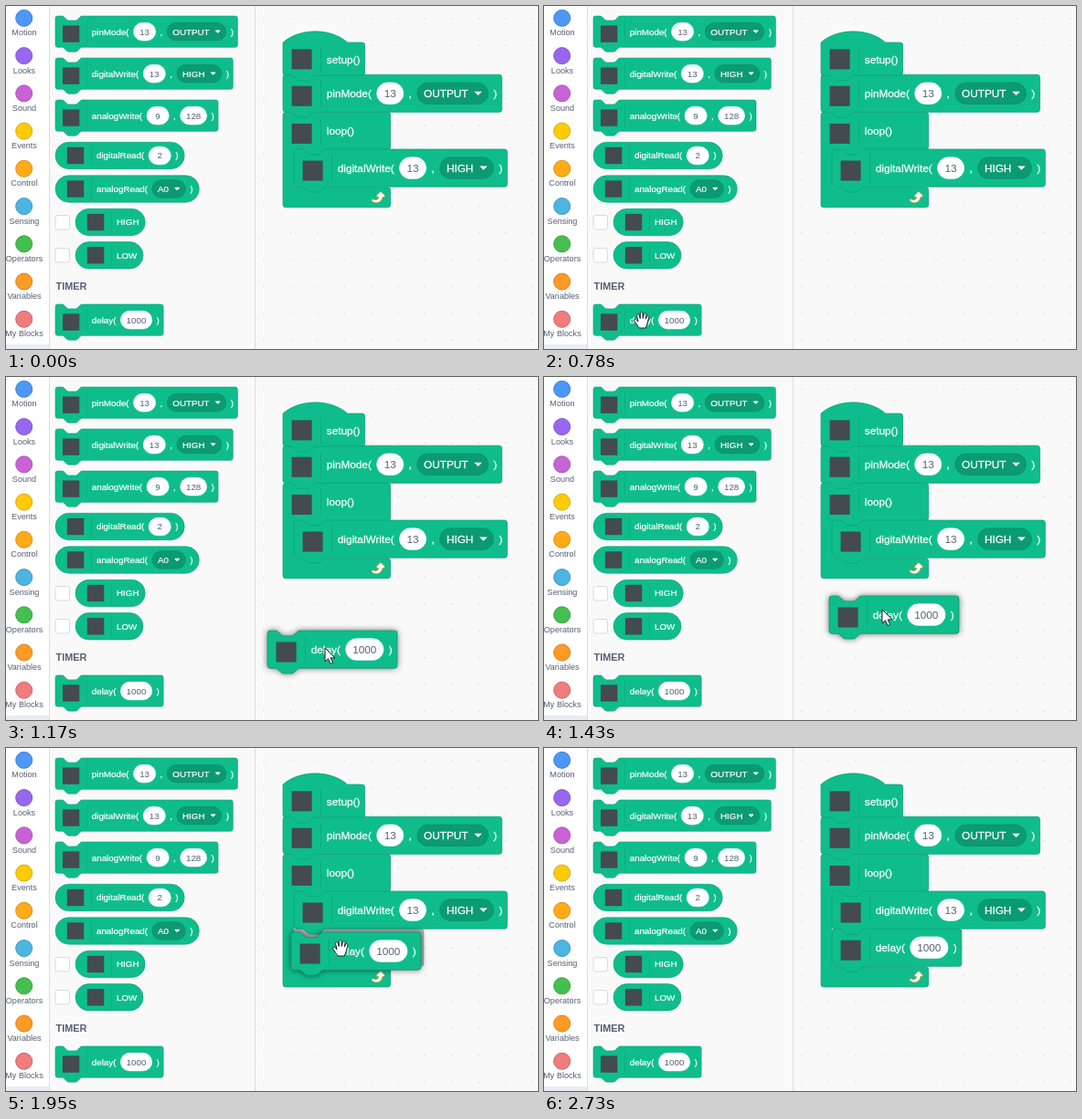
An HTML page with a canvas that plays this animation: 582x376 px, repeating every 3380 ms.

```html
<!DOCTYPE html>
<html lang="en">
<head>
<meta charset="utf-8">
<title>Block editor</title>
<style>
  html, body { margin: 0; width: 100%; height: 100%; overflow: hidden; background: #f9f9f9; }
  canvas { display: block; }
</style>
</head>
<body>
<canvas id="stage" width="582" height="376"></canvas>
<script>
const ctx = document.getElementById('stage').getContext('2d');
const LOOP = 3380, STEP = 130;
const SMALL = 0.612, LARGE = 0.735;
const GREEN = '#0fbd8c', EDGE = '#0c9f77', INK = '#575e75';
const FONT = '"Liberation Sans", Arial, sans-serif';

const CATEGORIES = [
  ['Motion', '#4d97f7'], ['Looks', '#9867ef'], ['Sound', '#c963d5'],
  ['Events', '#ffca08'], ['Control', '#ffab19'], ['Sensing', '#4cb5e2'],
  ['Operators', '#45bf4f'], ['Variables', '#ff9a24'], ['My Blocks', '#f07c7c']
];
const DELAY = ['delay(', '#1000', ')'];
const PIN_MODE = ['pinMode(', '#13', ',', '@OUTPUT', ')'];
const WRITE = ['digitalWrite(', '#13', ',', '@HIGH', ')'];

// Outline pieces, in block units
const NOTCH = 'c2 0 3 1 4 2l4 4c1 1 2 2 4 2h12c2 0 3-1 4-2l4-4c1-1 2-2 4-2';
const TAB = 'c-2 0-3 1-4 2l-4 4c-1 1-2 2-4 2h-12c-2 0-3-1-4-2l-4-4c-1-1-2-2-4-2';
const TOP = 'M0 4a4 4 0 0 1 4-4h8' + NOTCH;
const TURN = 'a4 4 0 0 1-4 4', BOTTOM_LEFT = 'H4a4 4 0 0 1-4-4z';

const SHAPES = {
  stack: w => `${TOP}H${w - 4}a4 4 0 0 1 4 4v48${TURN}H48${TAB}${BOTTOM_LEFT}`,
  hat: w => `M0 0c25-22 71-22 96 0H${w - 4}a4 4 0 0 1 4 4v41${TURN}H48${TAB}${BOTTOM_LEFT}`,
  loop: (w, inner) => `${TOP}H156a4 4 0 0 1 4 4v48${TURN}H64${TAB}H20a4 4 0 0 0-4 4` +
    `v${inner - 8}a4 4 0 0 0 4 4H156a4 4 0 0 1 4 4v22${TURN}${BOTTOM_LEFT}`,
  round: w => `M24 0H${w - 24}a24 24 0 0 1 0 48H24a24 24 0 0 1 0-48z`
};
const REPEAT = new Path2D('M23.3 11c-.3.6-.9 1-1.5 1h-1.6c-.1 1.3-.5 2.5-1.1 3.6-.9 1.7-2.3 3.2-4.1 4.1' +
  '-1.7.9-3.6 1.2-5.5.9-1.8-.3-3.5-1.1-4.9-2.3-.7-.7-.7-1.9 0-2.6.6-.6 1.6-.7 2.3-.2H7' +
  'c.9.6 1.9.9 2.9.9s1.9-.3 2.7-.9c1.1-.8 1.8-2.1 1.8-3.5h-1.5c-.9 0-1.7-.7-1.7-1.7 0-.4.2-.9.5-1.2' +
  'l4.4-4.4c.7-.6 1.7-.6 2.4 0L23 9.2c.5.5.6 1.2.3 1.8z');
const ARROW = new Path2D('M0 0V15l3.5-3.2 2.5 5.7 2.6-1.1-2.5-5.5H11z');
const HAND = new Path2D('M-3 9L-8 1.5c-1-2 1.2-3 2.4-1.4L-4 2-5.4-4.5c-.4-2 2-2.4 2.5-.6L-1.7-1.5' +
  'V-7c0-2 2.5-2 2.6 0L1.2-1.6 2.5-6.3c.5-1.8 2.8-1.2 2.5.7L4.2-.8 5.6-3.6' +
  'c.9-1.5 2.7-.7 2.2 1L5.8 4.5 4.4 9z');

function label(text, x, y, size, color, align = 'left', weight = '') {
  ctx.font = `${weight} ${size}px ${FONT}`;
  ctx.fillStyle = color;
  ctx.textAlign = align;
  ctx.fillText(text, x, y + size * 0.35);
}

// White block text, slightly heavier than regular
function blockText(text, x, y) {
  label(text, x, y, 16, '#fff');
  ctx.strokeStyle = '#fff';
  ctx.lineWidth = 0.35;
  ctx.strokeText(text, x, y + 5.6);
}

function paint(path, fill, stroke, width = 1) {
  ctx.fillStyle = fill;
  ctx.fill(path);
  ctx.strokeStyle = stroke;
  ctx.lineWidth = width;
  ctx.stroke(path);
}

function pill(x, y, w, fill, stroke) {
  const path = new Path2D();
  path.roundRect(x, y - 16, w, 32, 16);
  paint(path, fill, stroke);
}

function textWidth(text) {
  ctx.font = `16px ${FONT}`;
  return ctx.measureText(text).width;
}

// Parts: plain text, "#value" for an input, "@choice" for a dropdown
function partWidth(part) {
  const w = textWidth(part.replace(/^[#@]/, ''));
  return part[0] === '#' ? Math.max(39.5, w + 20.5) : part[0] === '@' ? w + 40 : w;
}

function drawPart(part, x, y, w) {
  const text = part.slice(1);
  if (part[0] === '#') {
    pill(x, y, w, '#fff', '#fff');
    label(text, x + w / 2, y, 16, INK, 'center');
  } else if (part[0] === '@') {
    pill(x, y, w, '#0c9a72', '#0b8e69');
    blockText(text, x + 10, y);
    paint(new Path2D(`M${x + w - 19} ${y - 2}h8l-4 4z`), '#fff', '#fff', 1.5);
  } else {
    blockText(part, x, y);
  }
}

function block(shape, x, y, scale, parts, { inner = 56, lifted = false, ghost = false } = {}) {
  const round = shape === 'round';
  const mid = { round: 24, hat: 26 }[shape] || 28;
  const iconY = { round: 24, hat: 25 }[shape] || 32;
  const left = round ? 73.5 : 65;
  const widths = parts.map(partWidth);
  const width = widths.reduce((sum, w) => sum + w + 8, left) + (round ? 3 : -1);
  const path = new Path2D(SHAPES[shape](width, inner));

  ctx.save();
  ctx.translate(x, y);
  ctx.scale(scale, scale);
  if (ghost) {
    paint(path, '#b2b2b2', '#999');
    ctx.restore();
    return;
  }
  if (lifted) {
    ctx.save();
    ctx.shadowColor = 'rgba(0,0,0,.6)';
    ctx.shadowBlur = 7;
    ctx.fill(path);
    ctx.restore();
  }
  paint(path, GREEN, EDGE);
  ctx.fillStyle = '#434b4e';
  ctx.fillRect(round ? 21 : 13, iconY - 15, 30, 30);
  ctx.fillStyle = '#0da57a';
  ctx.fillRect(round ? 64 : 56, mid - 20, 1, 40);

  let at = left;
  parts.forEach((part, i) => {
    drawPart(part, at, mid, widths[i]);
    at += widths[i] + 8;
  });
  if (shape === 'loop') {
    ctx.translate(128, 56 + inner + 2.5);
    paint(REPEAT, '#fff', '#cf8b17');
  }
  ctx.restore();
}

function checkbox(y) {
  const path = new Path2D();
  path.roundRect(54, y, 15.5, 15.5, 2.5);
  paint(path, '#fff', '#d9d9d9');
}

function drawPalette() {
  ctx.fillStyle = '#fff';
  ctx.fillRect(0, 0, 47, 376);
  ctx.fillStyle = '#e9edf4';
  ctx.fillRect(0, 371, 47, 5);
  ctx.fillStyle = '#dcdcdc';
  ctx.fillRect(47, 0, 1, 376);
  ctx.fillRect(272, 0, 1, 376);

  CATEGORIES.forEach(([name, color], i) => {
    const y = 13.3 + i * 41.25;
    const dot = new Path2D();
    dot.arc(19.7, y, 9, 0, 7);
    paint(dot, color, color);
    ctx.strokeStyle = 'rgba(0,0,0,.15)';
    ctx.stroke(dot);
    label(name, 20, y + 16, 9.1, INK, 'center');
  });

  block('stack', 54, 11, SMALL, PIN_MODE);
  block('stack', 54, 57, SMALL, WRITE);
  block('stack', 54, 103, SMALL, ['analogWrite(', '#9', ',', '#128', ')']);
  block('round', 54, 149.3, SMALL, ['digitalRead(', '#2', ')']);
  block('round', 54, 185.8, SMALL, ['analogRead(', '@A0', ')']);
  block('round', 76, 222.3, SMALL, ['HIGH']);
  block('round', 76, 258.6, SMALL, ['LOW']);
  checkbox(229.5);
  checkbox(265.5);
  label('TIMER', 54.5, 307, 10.9, INK, 'left', 'bold');
  block('stack', 54, 327, SMALL, DELAY);
}

function drawGrid() {
  ctx.fillStyle = '#dedede';
  for (let x = 576; x > 273; x -= 29.4)
    for (let y = 337 - 29.4 * 11; y < 376; y += 29.4) ctx.fillRect(x - 0.7, y - 0.7, 1.4, 1.4);
}

// Waypoints: time, x, y
const POINTER = [[260, 240, 330], [520, 107, 344], [780, 107, 344], [1170, 349, 297], [1430, 370, 255],
  [1690, 367, 220], [1950, 366, 219], [2340, 371, 223], [2470, 371, 223], [2600, 430, 290]];
const DRAG = [[780, 54, 327], [1170, 286, 278], [1430, 312, 240], [1690, 312, 206], [1950, 312, 202]];

function along(points, t) {
  const next = points.findIndex(p => p[0] >= t);
  if (next < 1) return points.at(next).slice(1);
  const [a, b] = [points[next - 1], points[next]];
  const f = (t - a[0]) / (b[0] - a[0]);
  return [a[1] + (b[1] - a[1]) * f, a[2] + (b[2] - a[2]) * f];
}

function drawPointer(t) {
  const hand = (t >= 520 && t <= 780) || (t >= 1950 && t <= 2470);
  ctx.save();
  ctx.translate(...along(POINTER, t));
  ctx.lineJoin = 'round';
  paint(hand ? HAND : ARROW, '#fff', '#222');
  ctx.restore();
}

function draw(t) {
  const dragging = t >= 910 && t < 2080;
  const open = t >= 1560;
  ctx.fillStyle = '#f9f9f9';
  ctx.fillRect(0, 0, 582, 376);
  drawGrid();
  drawPalette();

  block('loop', 303, 116.4, LARGE, ['loop()'], { inner: open ? 112 : 56 });
  block('stack', 303, 75.2, LARGE, PIN_MODE);
  block('hat', 303, 40, LARGE, ['setup()']);
  if (open) block('stack', 315, 198.2, LARGE, DELAY, { ghost: dragging });
  block('stack', 315, 157, LARGE, WRITE);
  if (dragging) block('stack', ...along(DRAG, t), LARGE, DELAY, { lifted: true });
  if (t >= 260 && t < 2730) drawPointer(t);
}

function tick() {
  draw(Math.floor(performance.now() % LOOP / STEP) * STEP);
  requestAnimationFrame(tick);
}
tick();
</script>
</body>
</html>
```
